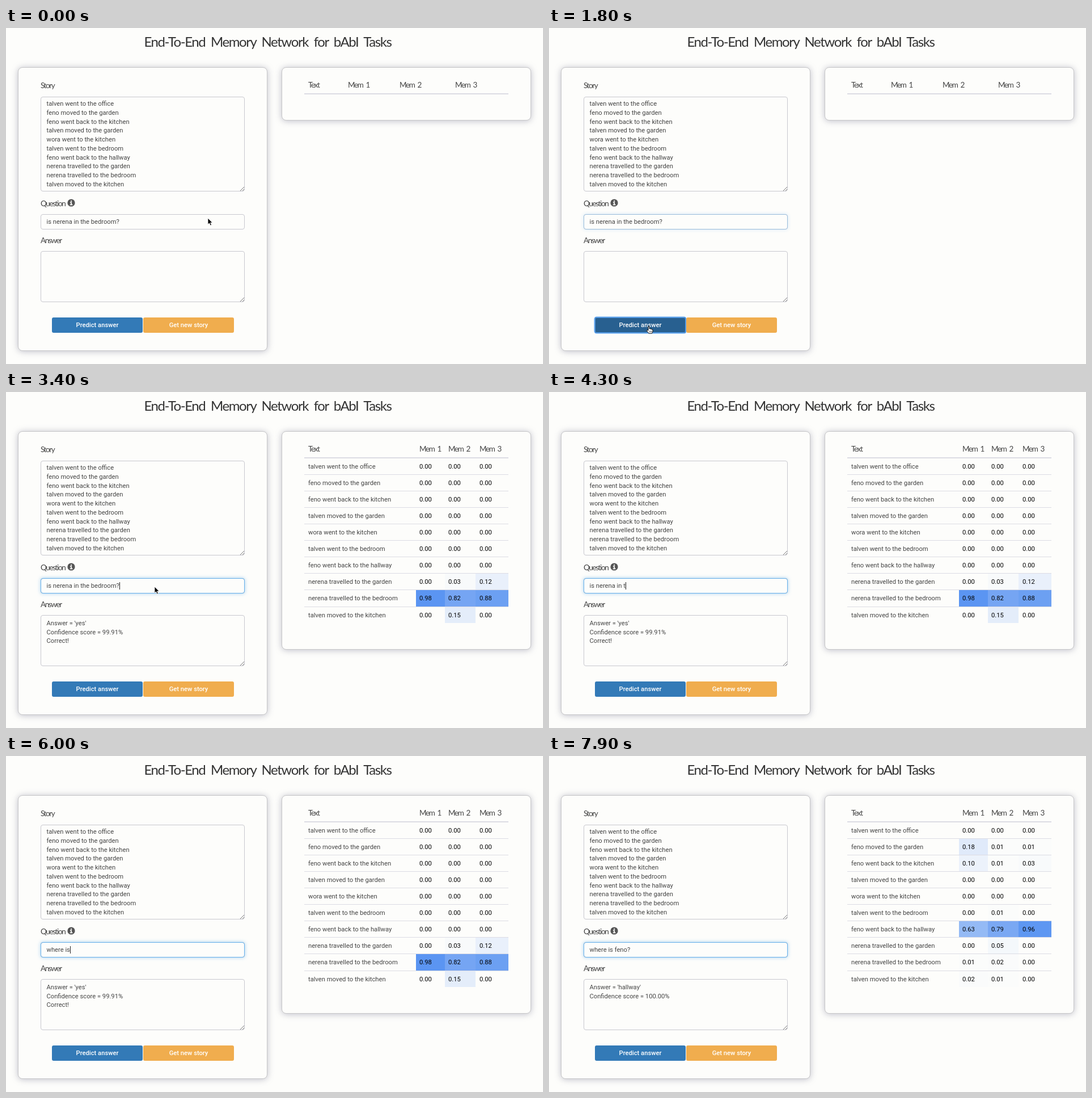
Recreate the animation shown at these times as an HTML page. Size 947 by 592 pixels, loop 8000 ms.

```html
<!DOCTYPE html>
<html lang="en">
<head>
<meta charset="utf-8">
<title>Memory network demo</title>
<style>
html, body { margin: 0; width: 100%; height: 100%; overflow: hidden; background: #fdfdfb; }
body { position: relative; font: 11.2px Roboto, sans-serif; color: #444; }
div, svg { position: absolute; box-sizing: border-box; }
.text { line-height: 16px; white-space: pre; }
.num { color: #000; }
.hand { font: 13.5px/16px Lato, sans-serif; letter-spacing: -1.4px; word-spacing: 3px; }
.title { font: 24px/32px Lato, sans-serif; letter-spacing: -1.4px; word-spacing: 4.8px; color: #333; text-align: center; }
.panel { border: 1px solid #c6c6c8; border-radius: 8px; background: #fdfdfb; box-shadow: 0 1px 12px rgba(100, 100, 130, .4); }
.field { border: 1px solid #c8c8cf; border-radius: 4px; }
.focus { border: 1px solid #66afe9; border-radius: 4px; box-shadow: 0 0 6px rgba(102, 175, 233, .6); }
.button { border-radius: 3px; color: #fff; text-align: center; line-height: 28px; font-weight: 500; }
.rule { background: #dcdce4; }
.caret { background: #222; }
</style>
</head>
<body>
<script>
const STORY = [
  'talven went to the office', 'feno moved to the garden', 'feno went back to the kitchen',
  'talven moved to the garden', 'wora went to the kitchen', 'talven went to the bedroom',
  'feno went back to the hallway', 'nerena travelled to the garden',
  'nerena travelled to the bedroom', 'talven moved to the kitchen'
];
const FIRST = 'is nerena in the bedroom?', SECOND = 'where is feno?';
const ANSWERS = ['', "Answer = 'yes'\nConfidence score = 99.91%\nCorrect!",
  "Answer = 'hallway'\nConfidence score = 100.00%"];
const MEMORY = [
  { 7: [0, .03, .12], 8: [.98, .82, .88], 9: [0, .15, 0] },
  { 1: [.18, .01, .01], 2: [.1, .01, .03], 5: [0, .01, 0], 6: [.63, .79, .96],
    7: [0, .05, 0], 8: [.01, .02, 0], 9: [.02, .01, 0] }
];
const LOOP = 8000, CLICK_INPUT = 250, CLICK_BUTTON = 1720, ANSWERED = 1950,
  REFOCUS = 2950, ERASE = 3500, REPEAT = 3960, TYPE = 5000, KEY = 130, ENTER = 7300;
const PATH = [[300, 356, 335], [900, 207, 493], [1350, 177, 526], [2000, 177, 526],
  [2500, 251, 369], [2850, 262, 343]];

function box(x, y, w, h, cls, parent = document.body) {
  const el = document.createElement('div');
  el.className = cls;
  el.style.cssText = `left:${x}px;top:${y}px;width:${w}px;height:${h}px`;
  parent.append(el);
  return el;
}
// y is the vertical middle of the first line
function text(x, y, str, cls = '', parent = document.body) {
  const el = box(x, y - 8, 0, 16, 'text ' + cls, parent);
  el.style.width = 'auto';
  el.textContent = str;
  return el;
}
function svg(x, y, w, h, body) {
  document.body.insertAdjacentHTML('beforeend',
    `<svg style="left:${x}px;top:${y}px" width="${w}" height="${h}">${body}</svg>`);
  return document.body.lastChild;
}
function button(x, color, label) {
  const el = box(x, 510, 160, 27, 'button');
  el.style.background = color;
  el.textContent = label;
  return el;
}
function table(memory) {
  const panel = box(486, 69, 440, memory ? 385 : 94, 'panel');
  const group = box(-487, -70, 0, 0, '', panel);
  const heads = memory ? [729, 780, 835] : [603, 694, 792];
  text(533, 100, 'Text', 'hand', group);
  heads.forEach((x, i) => text(x, 100, 'Mem ' + (i + 1), 'hand', group));
  if (memory) STORY.forEach((line, row) => {
    const top = 116.5 + 29.06 * row, edges = [723, 774, 828, 886];
    text(533, top + 15.5, line, '', group);
    (memory[row] || [0, 0, 0]).forEach((v, i) => {
      box(edges[i], top, edges[i + 1] - edges[i], 29.06, '', group)
        .style.background = `rgba(88,147,242,${v})`;
      text(heads[i], top + 15.5, v.toFixed(2), 'num', group);
    });
    if (row) box(526, Math.round(top - .5), 360, 1, 'rule', group);
  });
  box(526, 115, 360, 2, 'rule', group);
  return panel;
}

box(0, 8, 923, 32, 'title').textContent = 'End-To-End Memory Network for bAbI Tasks';
box(21, 69, 440, 500, 'panel');
text(61, 101, 'Story', 'hand');
text(61, 309, 'Question', 'hand');
text(61, 374, 'Answer', 'hand');
svg(108, 301, 14, 14, `<circle cx="7" cy="7" r="6.6" fill="#555"/>
  <path d="M6 3.8h2.2M5 6.4h2.2v4M4.8 10.4h4.6" fill="none" stroke="#fdfdfb" stroke-width="1.7"/>`);
box(61, 121, 360, 167, 'field');
box(61, 328, 360, 27, 'field');
box(61, 393, 360, 90, 'field');
for (const y of [280, 475])
  svg(413, y, 8, 8, '<path d="M0 7L7 0M4 7L7 4" stroke="#777"/>');
const focusRing = box(61, 328, 360, 27, 'focus');
STORY.forEach((line, i) => text(71.5, 134.2 + 15.73 * i, line));
const question = text(71.5, 342, FIRST);
const caret = box(0, 335, 1, 13, 'caret');
const answer = text(71.5, 408, '');
answer.style.lineHeight = '15.7px';
const predict = button(81, '#337ab7', 'Predict answer');
button(242, '#f0ad4e', 'Get new story');
const tables = [table(), ...MEMORY.map(table)];
const arrow = svg(0, 0, 12, 18, `<path d="M1 1V12.2L3.6 9.8L5.4 14L7.4 13.1L5.6 9.1H9Z"
  stroke="#fff" stroke-width=".8"/>`);
const hand = svg(0, 0, 14, 17, `<path d="M4 2Q5-.2 6 2V6Q7.4 5 8 6.4Q9.5 5.6 10 7Q12 6.5 12 8.5V11L10.5 14H5L1 9.2Q1.5 7.2 4 9Z"
  fill="#fff" stroke="#111"/><path d="M6.3 9.5v2.5M8.2 9.5v2.5M10 9.5v2.5" stroke="#111" stroke-width=".7"/>`);

const clamp = v => Math.max(0, Math.min(1, v));
const fade = (t, start) => clamp((t - start) / 150);

function pointer(t) {
  const i = PATH.findIndex(p => p[0] > t);
  if (i < 1) return (i ? PATH[PATH.length - 1] : PATH[0]).slice(1);
  const [t0, x0, y0] = PATH[i - 1], [t1, x1, y1] = PATH[i];
  const k = (t - t0) / (t1 - t0), e = k * k * (3 - 2 * k);
  return [x0 + (x1 - x0) * e, y0 + (y1 - y0) * e];
}
function typed(t) {
  if (t >= TYPE) return SECOND.slice(0, Math.floor((t - TYPE) / KEY) + 1);
  const held = t < REPEAT ? 0 : Math.floor((t - REPEAT) / 35) + 1;
  return FIRST.slice(0, Math.max(0, FIRST.length - (t >= ERASE ? 1 : 0) - held));
}
function lastInput(t) {
  if (t >= ENTER) return ENTER;
  if (t >= TYPE) return Math.min(t, TYPE + KEY * (SECOND.length - 1));
  if (t >= ERASE) return t;
  return t >= REFOCUS ? REFOCUS : CLICK_INPUT;
}
function show(el, on) { el.style.display = on ? '' : 'none'; }

function render(t) {
  const stage = t < ANSWERED ? 0 : t < ENTER + 50 ? 1 : 2;
  const [x, y] = pointer(t), over = y > 510, pressed = t >= CLICK_BUTTON && t < REFOCUS;
  const focused = t >= CLICK_INPUT && t < CLICK_BUTTON || t >= REFOCUS;

  question.textContent = typed(t);
  answer.textContent = ANSWERS[stage];
  tables.forEach((el, i) => show(el, i === stage));
  focusRing.style.opacity = fade(t, CLICK_INPUT) - fade(t, CLICK_BUTTON) + fade(t, REFOCUS);
  caret.style.left = 71.5 + question.getBoundingClientRect().width + 'px';
  show(caret, focused && Math.floor((t - lastInput(t)) / 500) % 2 === 0);

  predict.style.background = over || pressed ? '#286090' : '#337ab7';
  predict.style.boxShadow = pressed ? '0 0 0 1.5px #62a6f0, inset 0 0 0 1px #4d92d8' : 'none';
  show(arrow, !over && t < ERASE);
  show(hand, over && t < ERASE);
  arrow.style.transform = `translate(${x - 1}px,${y - 1}px)`;
  hand.style.transform = `translate(${x - 6}px,${y - 2}px)`;
}
const start = performance.now();
function tick() {
  render((performance.now() - start) % LOOP);
  requestAnimationFrame(tick);
}
tick();
</script>
</body>
</html>
```
